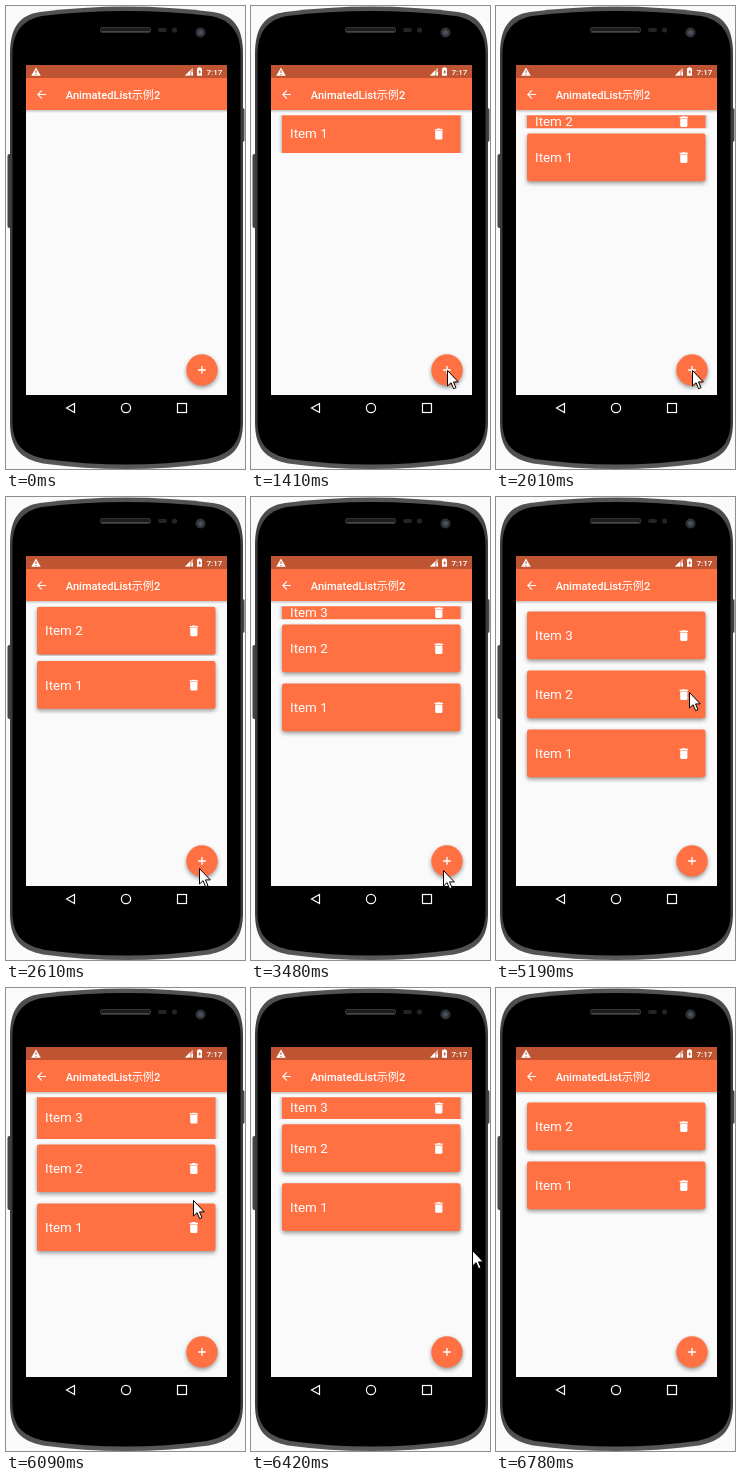
Recreate the animation shown at these times as an HTML page. Size 239x463 px, loop 7410 ms.

```html
<!DOCTYPE html>
<html lang="zh">
<meta charset="utf-8">
<title>AnimatedList</title>
<style>
html, body { margin: 0; width: 239px; height: 463px; overflow: hidden; background: #fafafa }
svg { display: block; font-family: Roboto, "Noto Sans CJK SC", "Noto Sans CJK", sans-serif }
.white { fill: #fff }
.line { fill: none; stroke: #fff; stroke-width: 1.2 }
.orange { fill: #ff7043 }
.card { filter: drop-shadow(0 2px 2.3px #0006) }
</style>
<svg width="239" height="463" viewBox="0 0 239 463">
  <defs>
    <linearGradient id="rim" x2="0" y2="1">
      <stop stop-color="#555"/><stop offset=".1" stop-color="#3c3c3c"/>
      <stop offset=".9" stop-color="#3c3c3c"/><stop offset="1" stop-color="#5a5a5a"/>
    </linearGradient>
    <linearGradient id="shade" x2="0" y2="1">
      <stop stop-opacity=".22"/><stop offset="1" stop-opacity="0"/>
    </linearGradient>
    <path id="bin" d="M6 19c0 1.1.9 2 2 2h8c1.1 0 2-.9 2-2V7H6zM19 4h-3.5l-1-1h-5l-1 1H5v2h14z"/>
  </defs>

  <!-- Phone body -->
  <rect x="1.500" y="148" width="5" height="74" rx="2" fill="#444"/>
  <rect x="233" y="102" width="5.500" height="34" rx="2" fill="#444"/>
  <path d="M4 48C4 22 13 9 34 6Q120-5 207 6C228 9 237 22 237 48V416C237 443 225 453 203 457.500Q120 468.500 37 457.500C15 453 4 443 4 416Z" fill="url(#rim)"/>
  <path d="M6.500 48C6.500 26 17 13.500 36 10Q120 0 205 10C224 13.500 234.500 26 234.500 48V416C234.500 439 222 448.500 201 453Q120 464 39 453C18 448.500 6.500 439 6.500 416Z"/>
  <rect x="94.500" y="21.500" width="50" height="5" rx="1.500" fill="#1c1c1c" stroke="#333"/>
  <path d="M96 25.500H143" stroke="#484848"/>
  <rect x="152" y="22" width="9" height="4" rx="2" fill="#242424"/>
  <circle cx="168.500" cy="24" r="2.600" fill="#242424"/>
  <circle cx="194.500" cy="26.500" r="5" fill="#2e3136"/>
  <circle cx="194.500" cy="26.500" r="2.500" fill="#4a515c"/>

  <!-- Screen -->
  <rect x="20" y="59" width="201" height="330" fill="#fafafa"/>
  <g id="list"></g>
  <rect x="20" y="104" width="201" height="3" fill="url(#shade)"/>
  <rect class="orange" x="20" y="72" width="201" height="32"/>
  <rect x="20" y="59" width="201" height="13" fill="#bf5432"/>
  <path class="white" d="M30 61.500L34.800 69.800H25.200Z"/>
  <path d="M30 64.300V67M30 68V69" stroke="#bf5432"/>
  <path d="M187 61.500V69.500H179Z" fill="#fff8"/>
  <path class="white" d="M184 64.500V69.500H179ZM185.500 66h1.500v3.500h-1.500z"/>
  <path class="white" d="M191 62.200h1.400v-1h2.200v1h1.400v7.600h-5z"/>
  <path d="M194 63.500l-1.700 3h1.200v2l1.600-3h-1.100z" fill="#bf5432"/>
  <text class="white" x="200.500" y="68.700" font-size="8" font-weight="500">7:17</text>
  <path class="white" transform="translate(28.800 81.800)scale(.556)" d="M20 11H7.830l5.590-5.590L12 4l-8 8 8 8 1.410-1.410L7.830 13H20z"/>
  <text class="white" x="59.800" y="92.700" font-size="11.100" font-weight="500">AnimatedList示例2</text>

  <!-- Add button and navigation -->
  <circle class="orange card" cx="196" cy="364" r="15.700"/>
  <path class="white" transform="translate(189.300 357.300)scale(.556)" d="M19 13.200h-5.800v5.800h-2.400v-5.800H5v-2.400h5.800V5h2.400v5.800h5.800z"/>
  <path class="line" d="M68.500 397.500V406.500L60.500 402Z"/>
  <circle class="line" cx="120" cy="402" r="4.600"/>
  <rect class="line" x="171.500" y="397.500" width="9" height="9"/>
  <path id="cursor" class="white" stroke="#000" d="M.5.500V16L4.100 12.700 6.600 18.700 9 17.700 6.500 11.900H11.300Z"/>
</svg>
<script>
const LOOP = 7410, GROW = 970, ROW = 59, TOP = 109.2;
const $ = id => document.getElementById(id);
const clamp = v => Math.max(0, Math.min(1, v));

// Newest item first; each row opens and closes around its centre.
const items = [
  { name: 'Item 3', add: 3267, remove: 5810 },
  { name: 'Item 2', add: 1797 },
  { name: 'Item 1', add: 789 }
];

// Pointer waypoints: time, x, y
const path = [
  [120, 214, 102], [360, 210, 245], [600, 203, 365], [780, 203, 365],
  [990, 196, 364], [2370, 196, 364], [2700, 192, 373], [3970, 192, 373],
  [4140, 167, 387], [4350, 141, 402], [4560, 118, 393], [4710, 115, 372],
  [4950, 150, 285], [5190, 193, 195], [5430, 186, 138], [5540, 186, 138],
  [5580, 186, 136], [5850, 186, 136], [6090, 187, 212], [6270, 202, 266],
  [6570, 240, 258]
];

$('list').innerHTML = items.map(({ name }) => `
  <svg x="25" width="190" height="0"><g>
    <rect class="orange card" x="6" y="5.300" width="178.500" height="47.700" rx="2.200"/>
    <text class="white" x="14" y="33.800" font-size="13.400">${name}</text>
    <use class="white" href="#bin" transform="translate(155.600 22.200)scale(.6)"/>
  </g></svg>`).join('');
const rows = [...$('list').children];

function pointer(t) {
  const i = path.findIndex(p => p[0] > t);
  if (i < 1) return null;
  const [a, b] = [path[i - 1], path[i]];
  const k = (t - a[0]) / (b[0] - a[0]);
  return [1, 2].map(n => a[n] + (b[n] - a[n]) * k);
}

function draw(t) {
  let y = TOP;
  items.forEach(({ add, remove = Infinity }, i) => {
    const open = clamp((t - add) / GROW) - clamp((t - remove) / GROW);
    const h = open * ROW, row = rows[i];
    row.setAttribute('y', y);
    row.setAttribute('height', h);
    row.firstElementChild.setAttribute('transform', `translate(0 ${(h - ROW) / 2})`);
    y += h;
  });

  const at = pointer(t);
  $('cursor').style.display = at ? '' : 'none';
  if (at) $('cursor').setAttribute('transform', `translate(${at.map(Math.round)})`);
}

const start = performance.now();
(function frame() {
  draw((performance.now() - start) % LOOP);
  requestAnimationFrame(frame);
})();
</script>
</html>
```
